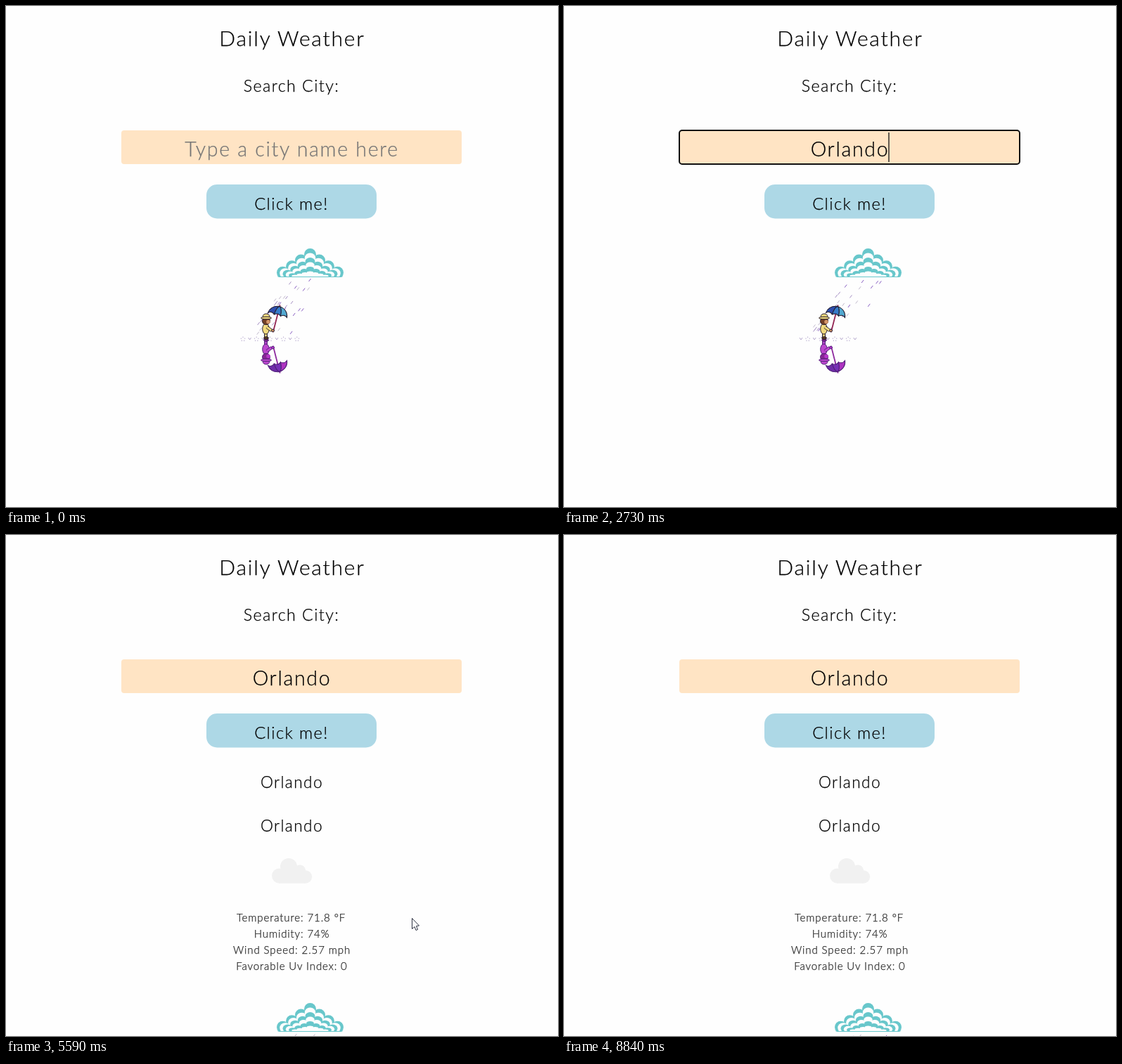
An HTML page with a canvas that plays this animation: 785 by 713 pixels, repeating every 8.97 s.

```html
<!DOCTYPE html>
<html lang="en">
<head>
<meta charset="utf-8">
<title>Daily Weather</title>
<style>
  html, body { margin: 0; width: 100%; height: 100%; overflow: hidden; background: #fefefe; }
  svg, canvas { position: absolute; left: 0; top: 0; width: 785px; height: 713px; }
  text {
    font: 300 22.7px Lato, "Open Sans", sans-serif; letter-spacing: .06em;
    text-anchor: middle; fill: #000; stroke: #000; stroke-width: .25px;
  }
  .title { font-size: 30px; }
  .search { font-size: 23.3px; }
  .field { font-size: 28.5px; }
  .empty { fill: #757575; stroke: #757575; }
  .button { font-size: 23.7px; }
  .details text { font-size: 15px; fill: #222; stroke: #222; }
</style>
</head>
<body>
<svg viewBox="0 0 785 713">
  <text class="title" x="407" y="57">Daily Weather</text>
  <text class="search" x="406" y="122">Search City:</text>
  <rect x="164" y="177" width="484" height="48" rx="4" fill="#ffe4c4"/>
  <rect id="focus" x="164" y="177" width="484" height="48" rx="4" fill="none" stroke="#101010" stroke-width="2"/>
  <text id="field" x="406.5" y="214"></text>
  <rect id="caret" y="180" width="1.3" height="42" fill="#111"/>
  <rect x="285" y="254" width="242" height="48.4" rx="15" fill="#add8e6"/>
  <text class="button" x="406" y="290">Click me!</text>
  <text id="city" x="406.5" y="360">Orlando</text>
  <g id="report">
    <text x="406.5" y="422">Orlando</text>
    <g fill="#f1f1f1">
      <circle cx="388.5" cy="485" r="10.5"/>
      <circle cx="402" cy="472" r="12"/>
      <circle cx="418" cy="477.5" r="8"/>
      <circle cx="426" cy="486.5" r="9.2"/>
      <rect x="388" y="476" width="38" height="19.7"/>
    </g>
    <g class="details">
      <text x="405.5" y="549.5">Temperature: 71.8 °F</text>
      <text x="406.5" y="572.5">Humidity: 74%</text>
      <text x="406.5" y="596">Wind Speed: 2.57 mph</text>
      <text x="406.5" y="619">Favorable Uv Index: 0</text>
    </g>
  </g>
</svg>
<canvas id="art" width="785" height="713"></canvas>
<script>
const LOOP = 8970, STEP = 130;
const FOCUS = 780, TYPE_START = 1640, KEY = 102, CLICK = 4030, CITY = 4290, REPORT = 4940;
const NAME = 'Orlando', LAST_KEY = TYPE_START + (NAME.length - 1) * KEY;
const $ = id => document.getElementById(id);
const ctx = $('art').getContext('2d');
const random = n => { const v = Math.sin(n * 12.9898) * 43758.5453; return v - Math.floor(v); };
const show = (id, on) => $(id).setAttribute('visibility', on ? 'visible' : 'hidden');

function paint(fill, stroke, width = 1) {
  if (fill) { ctx.fillStyle = fill; ctx.fill(); }
  if (stroke) { ctx.strokeStyle = stroke; ctx.lineWidth = width; ctx.stroke(); }
}

function line(x1, y1, x2, y2, color, width = 1) {
  ctx.beginPath();
  ctx.moveTo(x1, y1);
  ctx.lineTo(x2, y2);
  paint(null, color, width);
}

function oval(x, y, rx, ry, fill, stroke) {
  ctx.beginPath();
  ctx.ellipse(x, y, rx, ry, 0, 0, 2 * Math.PI);
  paint(fill, stroke);
}

function limb(x1, y1, x2, y2, color, ink) {
  line(x1, y1, x2, y2, ink, 4.6);
  line(x1, y1, x2, y2, color, 2.8);
}

// Nested scalloped heaps, alternating teal and white
function drawCloud() {
  ctx.save();
  ctx.beginPath();
  ctx.rect(380, 340, 105, 46);
  ctx.clip();
  ctx.translate(432.5, 385.5);
  for (let layer = 0; layer < 6; layer++) {
    const color = layer % 2 ? '#fefefe' : '#68c7cb';
    ctx.save();
    ctx.scale(1 - .09 * layer, 1 - .16 * layer);
    for (let i = -3; i <= 3; i++) {
      const height = 32 - 8.6 * Math.abs(i);
      oval(13 * i, -height, 8.5, 8.5, color);
      ctx.fillRect(13 * i - 7, -height, 14, height);
    }
    ctx.restore();
  }
  line(-43, 0, 43, 0, '#68c7cb');
  ctx.restore();
}

function drawRain(frame) {
  for (let i = 0; i < 30; i++) {
    const fall = (random(i + 1) * 76 + frame * 9) % 76;
    const x = 402 + 62 * random(i + 60) - fall * .72, y = 388 + fall;
    line(x + 1.5, y, x - 1.5, y + 4, `hsl(265 ${15 + i % 3 * 15}% ${76 - i % 3 * 10}%)`);
  }
  // Splashes alternate between a tick and a ring of dots
  for (let i = 0; i < 9; i++) {
    const x = 337 + i * 9.6, color = '#b5a8cd';
    if ((i + frame) % 2) {
      line(x - 2, 472, x, 475, color);
      line(x, 475, x + 2, 472, color);
    } else {
      for (let a = 0; a < 5; a++) oval(x + 2.8 * Math.sin(a * 1.257), 474 - 2.8 * Math.cos(a * 1.257), .7, .7, color);
    }
  }
}

function drawUmbrella(tint, ink) {
  ctx.save();
  ctx.translate(386, 440);
  ctx.rotate(.25);
  line(0, -15, 0, 25, tint(335, 60, 36), 1.8);
  const rim = i => -14 + i * 28 / 3;
  for (let i = 0; i < 3; i++) {
    const left = rim(i), right = rim(i + 1);
    ctx.beginPath();
    ctx.moveTo(0, -13);
    ctx.quadraticCurveTo(left * .9, -11, left, 0);
    ctx.quadraticCurveTo((left + right) / 2, -4, right, 0);
    ctx.quadraticCurveTo(right * .9, -11, 0, -13);
    paint(tint(225 - 13 * i, 58, 43 + 7 * i), ink);
  }
  ctx.restore();
}

function drawWalker(swing, tint) {
  const ink = tint(270, 25, 14), coat = tint(48, 80, 72), skin = tint(25, 55, 62), boot = tint(25, 45, 25);
  for (const side of [-1, 1]) {
    const foot = 369.5 + side * swing * 6;
    limb(369.5, 462, foot, 471, coat, ink);
    oval(foot + .5, 472.5, 3.2, 1.8, boot, ink);
  }
  ctx.save();
  ctx.translate(0, Math.abs(swing) * 1.6);
  oval(369.5, 459.5, 4.8, 7.5, coat, ink);
  oval(370, 448.5, 5.5, 5, tint(20, 50, 30), ink);
  oval(373, 449.5, 2.8, 2.8, skin);
  oval(370, 441.5, 4.8, 3.5, coat, ink);
  oval(370, 444, 7.5, 1.8, coat, ink);
  drawUmbrella(tint, ink);
  limb(371, 457, 378, 462, coat, ink);
  oval(379.5, 462, 2, 1.8, skin, ink);
  ctx.restore();
}

const daylight = (h, s, l) => `hsl(${h} ${s}% ${l}%)`;
const purple = (h, s, l) => `hsl(${h > 200 && h < 280 ? 272 : 292} 58% ${24 + l * .42}%)`;

function drawScene(frame, offset) {
  const swing = Math.sin(Math.PI * frame / 3.5);
  ctx.save();
  ctx.translate(0, offset);
  drawCloud();
  drawRain(frame);
  ctx.save();
  ctx.translate(0, 948);
  ctx.scale(1, -1);
  drawWalker(swing, purple);
  ctx.restore();
  drawWalker(swing, daylight);
  ctx.restore();
}

// Eases from start to end; clamps outside the time span
function glide(t, start, end, from, to) {
  const u = Math.min(1, Math.max(0, (t - start) / (end - start)));
  return from + (to - from) * u * u * (3 - 2 * u);
}

function pointerAt(t) {
  if (t >= 130 && t < 650) return [glide(t, 130, 650, 500, 430), glide(t, 130, 650, 595, 215)];
  if (t < 2990 || t >= 7150) return null;
  if (t < CLICK) return [glide(t, 2990, 3640, 770, 441), glide(t, 2990, 3640, 690, 272)];
  if (t < 4680) return [glide(t, 4160, 4680, 441, 464), glide(t, 4160, 4680, 272, 311)];
  if (t < 6500) return [glide(t, 4680, 5330, 464, 577), glide(t, 4680, 5330, 311, 545)];
  return [glide(t, 6630, 7150, 577, 606), glide(t, 6630, 7150, 545, 720)];
}

const arrow = new Path2D('M.5 .5V15.5L4 12.5L6 17.5L8.5 16.5L6.5 11.5L10.5 11Z');

function drawPointer(t) {
  const position = pointerAt(t);
  if (!position) return;
  ctx.save();
  ctx.translate(...position);
  ctx.fillStyle = '#fff';
  ctx.fill(arrow);
  ctx.strokeStyle = '#2b3040';
  ctx.lineWidth = 1;
  ctx.stroke(arrow);
  ctx.restore();
}

function drawField(t) {
  const letters = t < TYPE_START ? 0 : 1 + Math.floor((t - TYPE_START) / KEY);
  const field = $('field');
  field.textContent = letters ? NAME.slice(0, letters) : 'Type a city name here';
  field.setAttribute('class', letters ? 'field' : 'field empty');
  const focused = t >= FOCUS && t < CLICK;
  const sinceKey = letters ? Math.max(0, t - LAST_KEY) : t - FOCUS;
  const half = letters ? field.getComputedTextLength() / 2 : 0;
  $('caret').setAttribute('x', 405.5 + half);
  show('focus', focused);
  show('caret', focused && sinceKey % 1000 < 500);
}

function render() {
  const frame = Math.floor(performance.now() % LOOP / STEP), t = frame * STEP;
  drawField(t);
  show('city', t >= CITY);
  show('report', t >= REPORT);
  ctx.clearRect(0, 0, 785, 713);
  drawScene(frame, t >= REPORT ? 321 : t >= CITY ? 63 : 0);
  drawPointer(t);
  requestAnimationFrame(render);
}
render();
</script>
</body>
</html>
```
